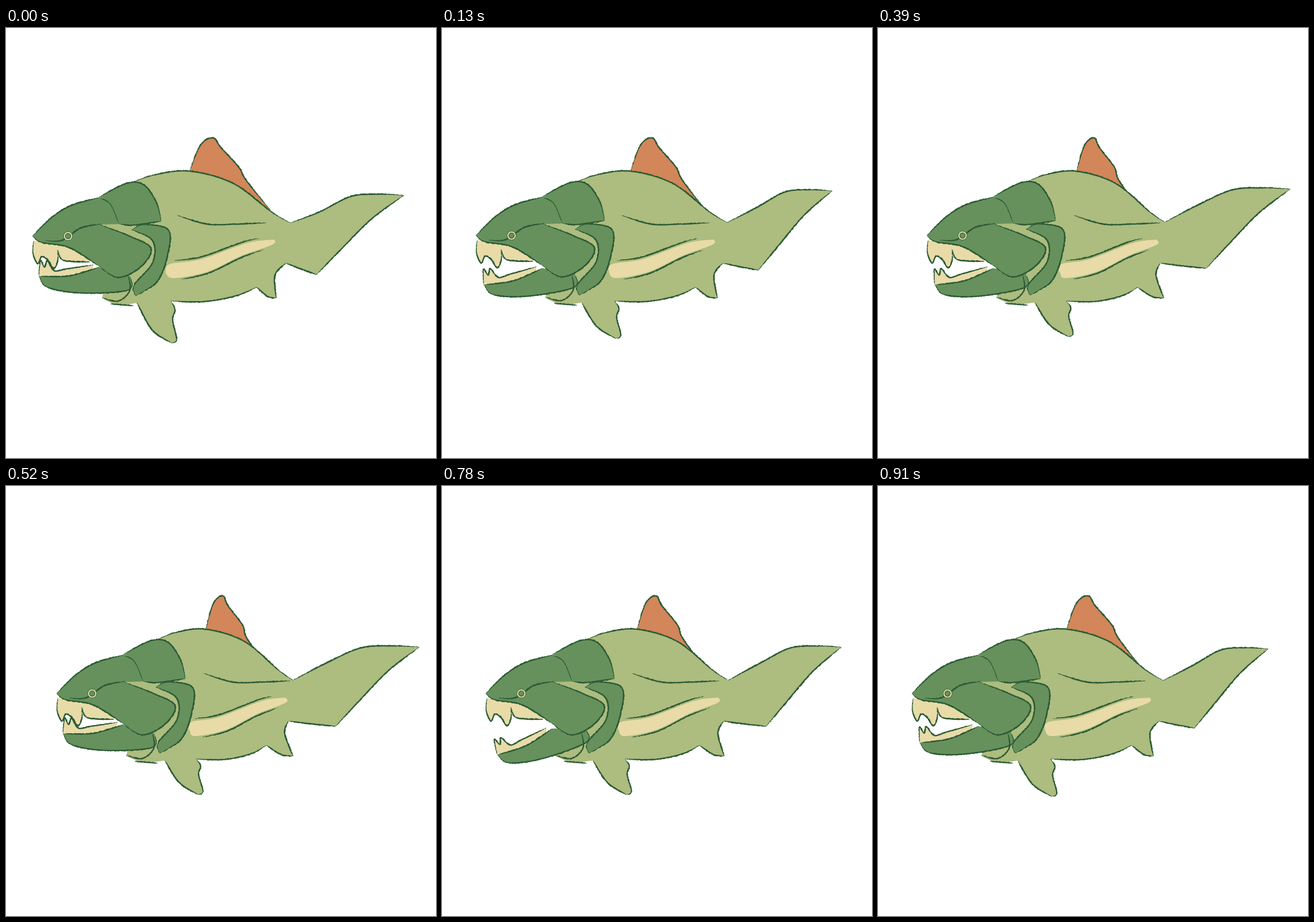
Recreate the animation shown at these times as an HTML page with a canvas. Size 748x748 px, loop 1.04 s.

```html
<!DOCTYPE html>
<html lang="en">
<head>
<meta charset="utf-8">
<title>Armoured fish</title>
<style>
html, body { margin: 0; width: 100%; height: 100%; overflow: hidden; background: #fff; }
canvas { display: block; width: 748px; height: 748px; }
</style>
</head>
<body>
<canvas id="stage" width="748" height="748"></canvas>
<script>
const ctx = document.getElementById('stage').getContext('2d');
const LIGHT = '#adbc7f', DARK = '#66915c', CREAM = '#e8dba8', ORANGE = '#d28659', INK = '#2b5a34';
const STEP = 130, HALF = 4;
const LUNGE = [0, 13, 30, 39, 42]; // how far the head has moved at each step

// Key points "x y x y ..." of smooth curves; a bar marks a corner.
// pull: share of the lunge that each corner follows; ink: pieces that get a line.
const BODY = {
  path: '215 270 260 255 320 249 395 270 462 320 495 339 | 545 320 600 293 650 289 692 291 |' +
    '635 333 580 388 540 429 | 510 418 487 409 | 468 430 470 470 | 455 467 436 451 |' +
    '400 466 345 476 287 475 | 294 490 290 508 297 542 288 548 | 254 525 228 478 | 195 482 167 470',
  pull: [1, 0.1, 0.65, 0.8, 0.1, 0.7, 0.4, 1.05, 1.1, 1.15, 1],
  color: LIGHT, ink: [0, 1, 2, 3, 4, 5, 6, 7, 8]
};
const FIN = {
  path: '319 250 338 204 360 191 374 208 405 242 418 265 460 317',
  pull: [0.67, -0.1], color: ORANGE, ink: [0]
};
const STRIPE = {
  path: '278 427 284 411 340 402 420 374 467 368 | 463 377 410 396 350 424 292 435 278 427',
  pull: [1, 0.45, 1], color: CREAM, ink: []
};
const FLANK = { path: '298 326 350 341 400 341 452 339', pull: [1.1, 1], ink: [0] };

const NECK = { path: '158 338 | 225 300 | 270 400 | 225 470 | 200 470 | 185 432', color: LIGHT, ink: [] };
const SKULL = {
  path: '46 362 80 329 115 308 162 295 | 182 306 197 341 | 163 342 |' +
    '215 362 252 383 235 415 195 434 160 413 | 110 382 62 373 46 362',
  color: DARK, ink: [0, 1, 3, 4]
};
const PLATE = {
  path: '162 294 210 270 240 273 262 304 270 336 | 222 343 197 341 | 182 306 162 294',
  color: DARK, ink: [0, 1]
};
const GILL = {
  path: '219 351 240 342 283 352 280 400 264 440 240 458 225 466 | 223 447 255 408 255 370 219 351',
  color: DARK, ink: [0, 1]
};
const FANGS = {
  path: '48 370 47 392 55 410 62 398 72 403 83 418 90 405 90 386 | 100 404 146 407 | 115 380 48 370',
  color: CREAM, ink: [0, 1]
};
const LOWER_TEETH = {
  path: '57 433 60 405 67 416 72 405 84 422 105 419 152 412 | 140 427 57 433',
  color: CREAM, ink: [0]
};
const JAW = {
  path: '58 432 110 431 162 416 | 216 432 | 212 456 130 461 72 451 58 432',
  color: DARK, ink: [0, 2]
};
const CREASES = ['68 370 98 369 130 348 165 341', '167 469 195 475 215 457 213 430', '182 480 222 483']
  .map(path => ({ path, ink: [0] }));

const clamp = v => Math.max(0, Math.min(1, v));

// Body points follow the head by their pull; tail and pectoral tips rise, the tail swings.
function flex([x, y], pull, lunge) {
  const p = clamp(lunge / 39);
  const rise = 11 * (1 - (1 - p) ** 3) * (clamp((x - 490) / 50) + clamp((y - 475) / 60));
  const swing = 25 * Math.sin(Math.PI * p) * clamp((x - 540) / 150);
  return [x + lunge * pull - swing, y - rise];
}

// Catmull-Rom samples through the given points
function smooth(pts) {
  const out = [], last = pts.length - 1;
  for (let i = 0; i < last; i++) {
    const [a, b, c, d] = [pts[Math.max(0, i - 1)], pts[i], pts[i + 1], pts[Math.min(last, i + 2)]];
    const steps = Math.max(2, Math.ceil(Math.hypot(c[0] - b[0], c[1] - b[1]) / 1.5));
    for (let k = 0; k < steps; k++) {
      const t = k / steps;
      out.push([0, 1].map(j => b[j] + t / 2 * (c[j] - a[j] +
        t * (2 * a[j] - 5 * b[j] + 4 * c[j] - d[j] + t * (3 * (b[j] - c[j]) + d[j] - a[j])))));
    }
  }
  out.push(pts[last]);
  return out;
}

function trace({ path, pull }, lunge) {
  let end = null;
  return path.split('|').map((part, i) => {
    const nums = part.trim().split(/\s+/).map(Number);
    const pts = end ? [end] : [];
    for (let k = 0; k < nums.length; k += 2) pts.push([nums[k], nums[k + 1]]);
    end = pts[pts.length - 1];
    if (!pull) return smooth(pts);
    return smooth(pts.map((pt, k) =>
      flex(pt, pull[i] + (pull[i + 1] - pull[i]) * k / (pts.length - 1), lunge)));
  });
}

function polygon(pts, color) {
  ctx.beginPath();
  pts.forEach(p => ctx.lineTo(p[0], p[1]));
  ctx.closePath();
  ctx.fillStyle = color;
  ctx.fill();
}

const noise = n => {
  const v = Math.sin(n * 12.9898) * 43758.5453;
  return v - Math.floor(v) - 0.5;
};

// Dry-brush line: tapered ends, ragged edges
function brush(pts) {
  const n = pts.length - 1, left = [], right = [];
  pts.forEach((p, i) => {
    const a = pts[Math.max(0, i - 1)], b = pts[Math.min(n, i + 1)];
    const len = Math.hypot(b[0] - a[0], b[1] - a[1]) || 1;
    const nx = (a[1] - b[1]) / len, ny = (b[0] - a[0]) / len;
    const half = 0.3 + clamp(1.6 * Math.sin(Math.PI * i / n));
    const l = half + noise(i + pts[0][0]) * 0.6, r = half + noise(i + pts[0][1] + 500) * 1.2;
    left.push([p[0] + nx * l, p[1] + ny * l]);
    right.unshift([p[0] - nx * r, p[1] - ny * r]);
  });
  polygon(left.concat(right), INK);
}

function paint(shape, lunge = 0) {
  const parts = trace(shape, lunge);
  if (shape.color) polygon(parts.flat(), shape.color);
  shape.ink.forEach(i => brush(parts[i]));
  return parts;
}

function disc(x, y, r, color) {
  ctx.beginPath();
  ctx.arc(x, y, r, 0, 7);
  ctx.fillStyle = color;
  ctx.fill();
}

function drawJaw(angle) {
  ctx.save();
  ctx.translate(185, 420);
  ctx.rotate(-angle * Math.PI / 180);
  ctx.translate(-185, -420);
  [LOWER_TEETH, JAW].forEach(s => paint(s));
  ctx.restore();
}

function drawHead(lunge, bite) {
  ctx.save();
  ctx.translate(lunge, lunge ? -1 : 0);
  [NECK, FANGS].forEach(s => paint(s));
  drawJaw(bite);
  [SKULL, PLATE, GILL, ...CREASES].forEach(s => paint(s));
  [[8, INK], [7.3, CREAM], [5.2, INK], [4, DARK]].forEach(([r, color]) => disc(108, 362, r, color));
  ctx.restore();
}

function draw(k) {
  const lunge = LUNGE[k];
  ctx.fillStyle = '#fff';
  ctx.fillRect(0, 0, 748, 748);
  [FIN, BODY, FLANK].forEach(s => paint(s, lunge));
  // Loose lines just off the stripe
  paint(STRIPE, lunge).forEach((pts, i) => {
    const trim = Math.round(pts.length * 0.15), off = i ? 3 : -4;
    brush(pts.slice(trim, -trim).map(([x, y]) => [x, y + off]));
  });
  drawHead(lunge, 17 * Math.sin(Math.PI * k / HALF) ** 2 ** 1.3);
}

let shown = -1;
function tick() {
  const step = Math.floor(performance.now() / STEP) % (2 * HALF);
  const k = HALF - Math.abs(HALF - step);
  if (k !== shown) draw(shown = k);
  requestAnimationFrame(tick);
}
tick();
</script>
</body>
</html>
```
